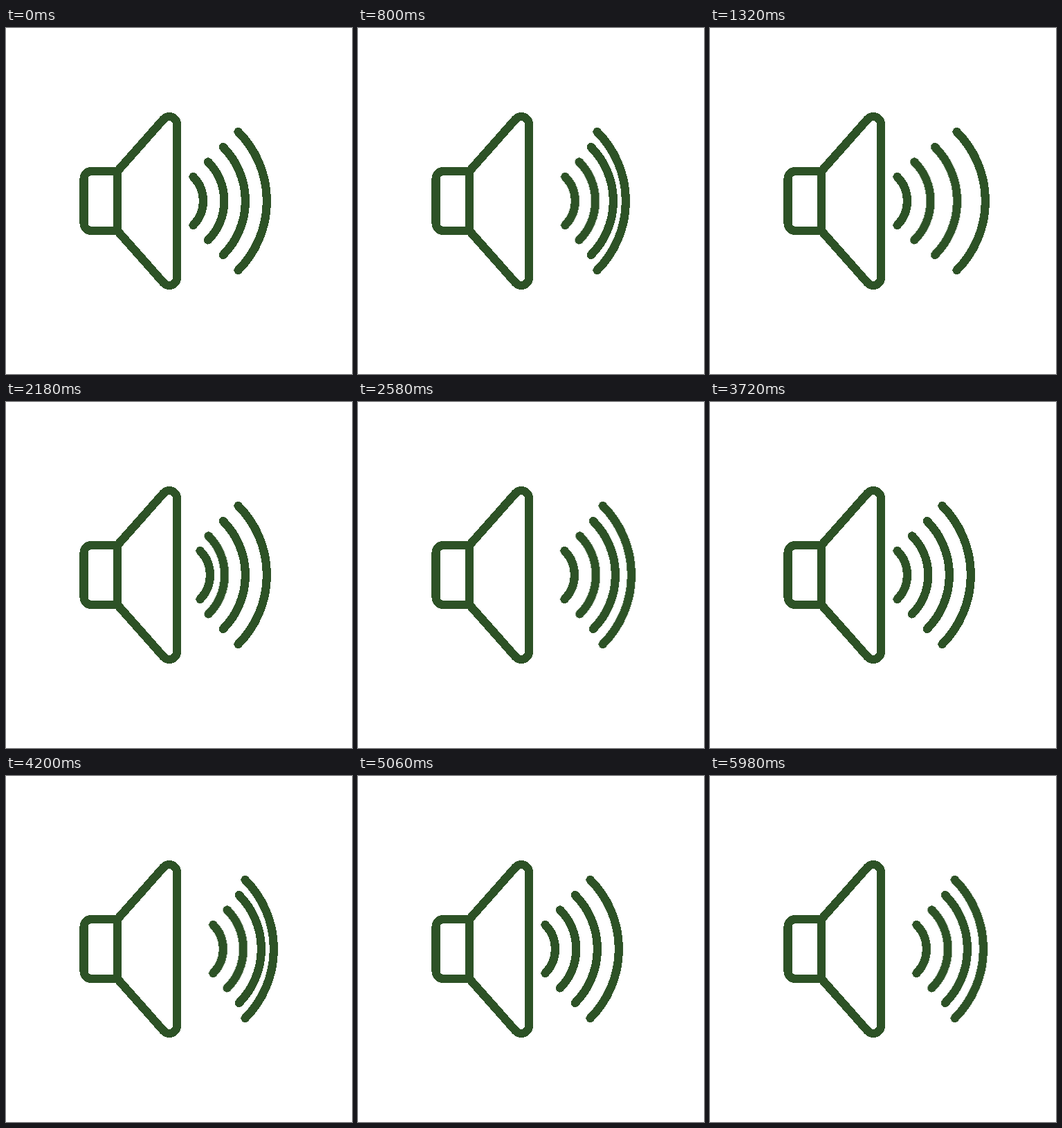
Write an HTML page without scripts that moves like this. It is 500 px wide and 500 px high and loops after 6 s.

```html
<!DOCTYPE html>
<html lang="en">
<head>
<meta charset="utf-8">
<title>Speaker</title>
<style>
  html, body { margin: 0; width: 100%; height: 100%; overflow: hidden; background: #fff; }
  svg { display: block; width: 100%; height: 100%; shape-rendering: crispEdges; }

  .line {
    fill: none;
    stroke: #2d5226;
    stroke-width: 12.2;
    stroke-linecap: round;
    stroke-linejoin: round;
  }

  /* Two sets of waves: the second plays the last pulse, which the loop cuts short. */
  .main { --start: 298ms; animation: early 6s step-end infinite; }
  .last { --start: 5418ms; animation: late 6s step-end infinite; }

  .wave { animation: pulse 6s calc(var(--start) + var(--i) * 113ms) infinite; }
  .w0 { --i: 0; }
  .w1 { --i: 1; }
  .w2 { --i: 2; }
  .w3 { --i: 3; }

  @keyframes early {
    0% { visibility: visible; }
    90%, 100% { visibility: hidden; }
  }
  @keyframes late {
    0% { visibility: hidden; }
    90%, 100% { visibility: visible; }
  }
  @keyframes pulse {
    0%, 28.667%, 56.667% {
      transform: translateX(0);
      animation-timing-function: cubic-bezier(.44, 0, .25, 1);
    }
    8.4%, 37.067%, 65.067% {
      transform: translateX(28.7px);
      animation-timing-function: cubic-bezier(.37, 0, .58, 1);
    }
    17.333%, 46%, 74%, 100% {
      transform: translateX(0);
      animation-timing-function: linear;
    }
  }
</style>
</head>
<body>
<svg viewBox="0 0 500 500">
  <defs>
    <path id="a0" d="M270.5 215a49.5 49.5 0 0 1 0 70"/>
    <path id="a1" d="M292 193.5a80 80 0 0 1 0 113"/>
    <path id="a2" d="M313.7 172a110.5 110.5 0 0 1 0 156"/>
    <path id="a3" d="M335.5 150a141.4 141.4 0 0 1 0 200"/>
  </defs>

  <g class="line">
    <path d="M161 207H123.500a11 11 0 0 0-11 11V282a11 11 0 0 0 11 11H161Z"/>
    <path d="M161 207L227.800 131.700A11 11 0 0 1 247 139V361A11 11 0 0 1 227.800 368.300L161 293"/>
  </g>

  <g class="line main">
    <use class="wave w0" href="#a0"/>
    <use class="wave w1" href="#a1"/>
    <use class="wave w2" href="#a2"/>
    <use class="wave w3" href="#a3"/>
  </g>
  <g class="line last">
    <use class="wave w0" href="#a0"/>
    <use class="wave w1" href="#a1"/>
    <use class="wave w2" href="#a2"/>
    <use class="wave w3" href="#a3"/>
  </g>
</svg>
</body>
</html>
```
